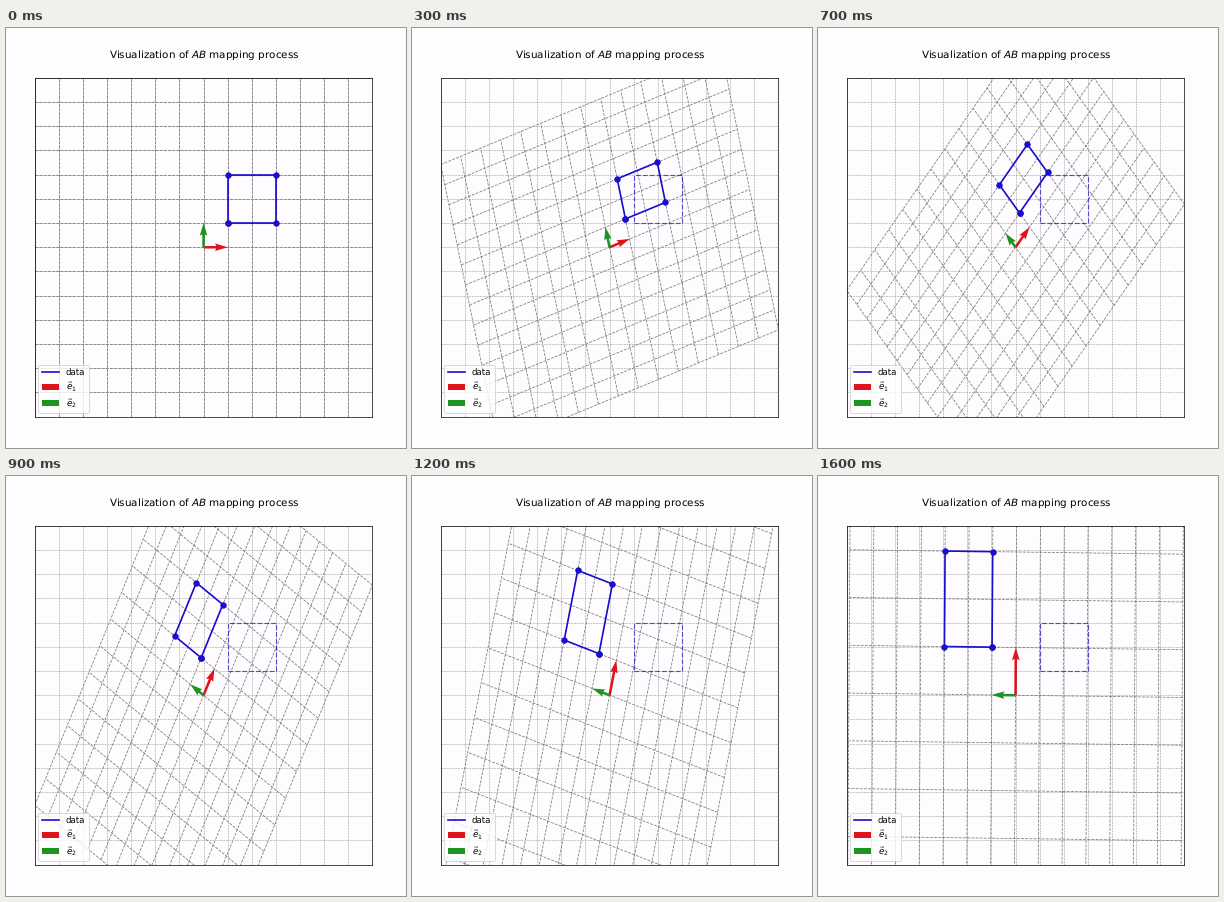
Animation of 400x420 px, one loop 1700 ms. Source, as a matplotlib script:

```python
import numpy as np
import matplotlib.pyplot as plt
from matplotlib.animation import FuncAnimation
from matplotlib.collections import LineCollection

W, H, DPI = 400, 420, 62.5
LEFT, TOP, AX_W, AX_H = 28.7, 49.9, 337.7, 338.7
LIM = 7
FRAMES, INTERVAL = 17, 100
PAPER, GRAY = "#fefcfe", "#7a7a7a"
BLUE, RED, GREEN = "#1a0dcc", "#de141c", "#1f9322"

AB = np.array([[0, -1], [2, 0]])
SQUARE = np.array([[1, 1], [3, 1], [3, 3], [1, 3], [1, 1]])

# Blend progress at a few key steps; linear in between.
KEY_STEPS = [0, 2, 5, 7, 9, 12, 16]
KEY_BLEND = [0, 0.111, 0.29, 0.418, 0.55, 0.72, 0.987]


def unit_grid():
    ticks = np.arange(-LIM, LIM + 1)
    vertical = [[(k, -LIM), (k, LIM)] for k in ticks]
    horizontal = [[(-LIM, k), (LIM, k)] for k in ticks]
    return np.array(vertical + horizontal, dtype=float)


def add_arrow(vec, color, label):
    return ax.quiver([0], [0], [vec[0]], [vec[1]], color=color, label=label,
                     angles="xy", scale_units="xy", scale=1, zorder=4)


plt.rcParams.update({"font.family": "DejaVu Sans", "text.hinting": "none"})
fig = plt.figure(figsize=(W / DPI, H / DPI), dpi=DPI, facecolor=PAPER)
ax = fig.add_axes([LEFT / W, 1 - (TOP + AX_H) / H, AX_W / W, AX_H / H],
                  facecolor=PAPER)
ax.set(xlim=(-LIM, LIM), ylim=(-LIM, LIM), xticks=[], yticks=[])
fig.text(198 / W, 1 - 30 / H, "Visualization of $AB$ mapping process",
         fontsize=12, ha="center", va="baseline")

GRID = unit_grid()
ax.add_collection(LineCollection(GRID, colors=GRAY, linewidths=0.6,
                                 linestyles="--", alpha=0.8, zorder=1))
mapped_grid = LineCollection(GRID, colors=GRAY, linewidths=0.9,
                             linestyles="--", zorder=1.5)
ax.add_collection(mapped_grid)

ax.plot(*SQUARE.T, color=BLUE, lw=1.3, ls=(0, (4.3, 1.8)), alpha=0.7, zorder=2)
outline, = ax.plot(*SQUARE.T, color=BLUE, lw=1.9, label="data", zorder=3)
corners, = ax.plot(*SQUARE.T, "o", color=BLUE, ms=6.3, zorder=3)
e1 = add_arrow((1, 0), RED, r"$\vec{e}_1$")
e2 = add_arrow((0, 1), GREEN, r"$\vec{e}_2$")
ax.legend(loc="lower left", fontsize=10, labelspacing=0.34,
          borderaxespad=0.4).set_zorder(6)


def update(step):
    t = np.interp(step, KEY_STEPS, KEY_BLEND)
    m = (1 - t) * np.eye(2) + t * AB
    mapped_grid.set_segments(GRID @ m.T)
    points = (SQUARE @ m.T).T
    outline.set_data(*points)
    corners.set_data(*points)
    for arrow, (u, v) in zip((e1, e2), m.T):
        arrow.set_UVC([u], [v])
    return mapped_grid, outline, corners, e1, e2


anim = FuncAnimation(fig, update, frames=FRAMES, interval=INTERVAL,
                     repeat=True, repeat_delay=0, blit=False)
plt.show()
```
